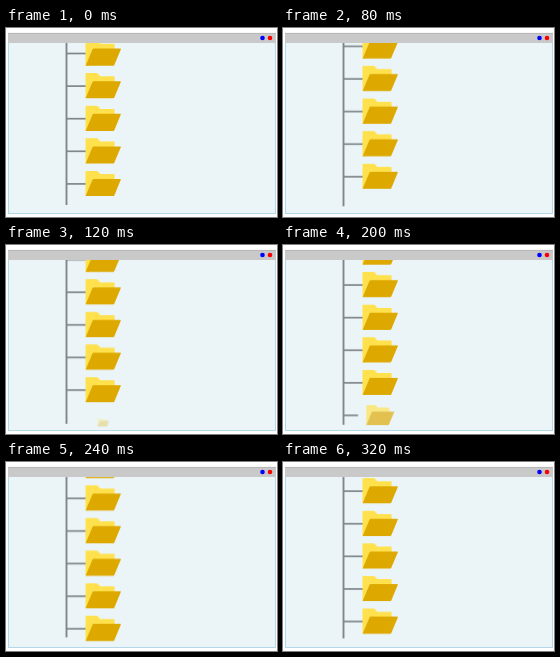
An HTML page for the animation above (0.36 s loop, 271 px wide and 189 px high).

```html
<!DOCTYPE html>
<html lang="en">
<head>
<meta charset="utf-8">
<title>Scrolling folder tree</title>
<style>
  html, body { margin: 0; width: 100%; height: 100%; overflow: hidden; background: #fff; }
  svg { display: block; width: 100%; height: 100%; }

  .tree { animation: scroll 360ms steps(9) infinite; }
  .spine { transform-origin: 60.5px 15px; animation: stretch 360ms step-end infinite; }
  .new-branch { transform-origin: 60.5px 0; animation: extend 360ms step-end infinite; }
  .new-folder { transform-origin: 97.3px 0; animation: pop 360ms step-end infinite; }

  @keyframes scroll { to { transform: translateY(-32.6px); } }
  @keyframes stretch {
    0% { transform: scaleY(1); }
    11.111% { transform: scaleY(1.004); }
    22.222% { transform: scaleY(1.008); }
    33.333% { transform: scaleY(1.011); }
    44.444% { transform: scaleY(1.014); }
    55.555% { transform: scaleY(1.017); }
    66.666% { transform: scaleY(.99); }
    77.777% { transform: scaleY(.993); }
    88.888% { transform: scaleY(.996); }
  }
  @keyframes extend {
    0% { transform: scaleX(0); }
    44.444% { transform: scaleX(.4); }
    55.555% { transform: scaleX(.75); }
    66.666%, 100% { transform: scaleX(1); }
  }
  @keyframes pop {
    0% { transform: scale(0); opacity: 0; }
    33.333% { transform: scale(.32); opacity: .3; }
    44.444% { transform: scale(.56); opacity: .47; }
    55.555% { transform: scale(.79); opacity: .68; }
    66.666%, 100% { transform: scale(1); opacity: 1; }
  }
</style>
</head>
<body>
<svg viewBox="0 0 271 189" preserveAspectRatio="none">
  <defs>
    <clipPath id="pane"><rect x="2" y="15" width="267" height="170"/></clipPath>
    <path id="branch" d="M60.5 0H80" stroke="#80868b" stroke-width="1.7"/>
    <g id="folder">
      <path d="M79.5 12V-12.3Q79.5 -13 80.2 -13H90.5Q91.5 -13 92.2 -12.2L94.2 -9.8H107.8Q108.6 -9.8 108.6 -9V0L84 12Z" fill="#ffe14d"/>
      <path d="M79.6 12.2L86.6 -4.3Q86.9 -4.9 87.6 -4.9H114.2Q115.1 -4.9 114.8 -4.1L108.3 11.5Q108 12.2 107.2 12.2Z" fill="#dda900"/>
    </g>
    <g id="row"><use href="#branch"/><use href="#folder"/></g>
  </defs>

  <rect x="2.5" y="5.5" width="267" height="180" fill="#ebf5f7" stroke="#b3d9e8"/>
  <g clip-path="url(#pane)">
    <path class="spine" d="M60.5 15V177" stroke="#80868b" stroke-width="1.9"/>
    <g class="tree">
      <use href="#row" y="25.5"/>
      <use href="#row" y="58.1"/>
      <use href="#row" y="90.7"/>
      <use href="#row" y="123.3"/>
      <use href="#row" y="155.9"/>
      <g transform="translate(0 188.5)">
        <g class="new-branch"><use href="#branch"/></g>
        <g class="new-folder"><use href="#folder"/></g>
      </g>
    </g>
  </g>
  <rect x="2" y="5" width="268" height="10" fill="#c9c9c9"/>
  <path d="M2 5.4H270" stroke="#b2b2b2" stroke-width=".8"/>
  <circle cx="256.5" cy="10" r="2.3" fill="#00f"/>
  <circle cx="264" cy="10" r="2.3" fill="#f00"/>
</svg>
</body>
</html>
```
